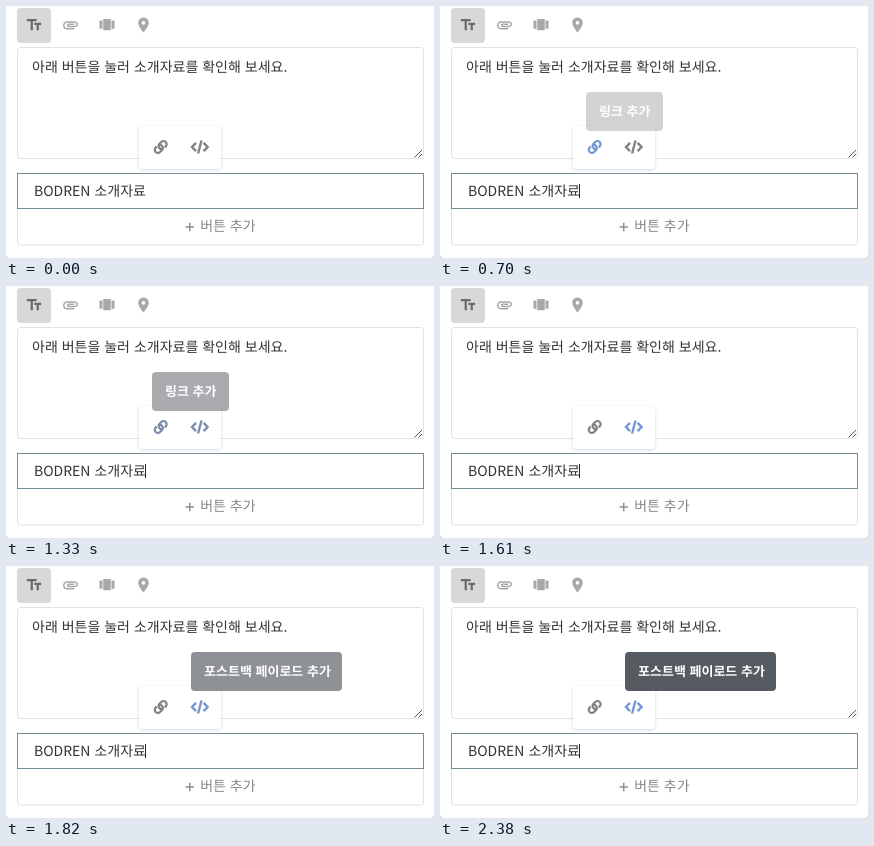
Recreate the animation shown at these times as an HTML page. Size 428 by 252 pixels, loop 2800 ms.

```html
<!DOCTYPE html>
<html lang="ko">
<head>
<meta charset="utf-8">
<style>
  html, body { margin: 0; width: 100%; height: 100%; overflow: hidden; background: #ccc; }
  svg { display: block; width: 428px; height: 252px; fill: none; }
  text {
    font: 14px "Noto Sans CJK KR", "Noto Sans CJK", sans-serif;
    fill: #333;
    text-rendering: geometricPrecision;
  }
  .icon { fill: #a8a8a8; }
  .box { fill: #fff; stroke: #e2e2e2; }
  .popup { fill: #fff; filter: drop-shadow(0 1.5px 1.5px rgba(40, 50, 80, .2)); }
  .tip rect { fill: #565a61; }
  .tip text { font-size: 13px; font-weight: 700; fill: #fff; }
</style>
</head>
<body>
<svg viewBox="0 0 428 252">
  <rect y="-9" width="428" height="261" rx="4" fill="#fff"/>

  <!-- tabs -->
  <rect x="11" y="2" width="34" height="35" rx="4" fill="#d8d8d8"/>
  <g class="icon">
    <path style="fill:#6c6c6c" transform="translate(19 10) scale(.75)" d="M2.5 4v3h5v12h3V7h5V4h-13zm19 5h-9v3h3v7h3v-7h3V9z"/>
    <path transform="translate(55.5 10) scale(.75)" d="M2 12.5C2 9.46 4.46 7 7.5 7H18c2.21 0 4 1.79 4 4s-1.79 4-4 4H9.5C8.12 15 7 13.88 7 12.5S8.12 10 9.5 10H17v2H9.41c-.55 0-.55 1 0 1H18c1.1 0 2-.9 2-2s-.9-2-2-2H7.5C5.57 9 4 10.57 4 12.5S5.57 16 7.5 16H17v2H7.5C4.46 18 2 15.54 2 12.5z"/>
    <path transform="translate(92 10) scale(.75)" d="M7 19h10V4H7v15zm-5-2h4V6H2v11zM18 6v11h4V6h-4z"/>
    <path transform="translate(128.5 10) scale(.75)" d="M12 2C8.13 2 5 5.13 5 9c0 5.25 7 13 7 13s7-7.75 7-13c0-3.87-3.13-7-7-7zm0 9.5a2.5 2.5 0 0 1 0-5 2.5 2.5 0 0 1 0 5z"/>
  </g>

  <!-- message -->
  <rect class="box" x="11.5" y="41.5" width="406" height="111" rx="3"/>
  <text x="26" y="65.5">아래 버튼을 눌러 소개자료를 확인해 보세요.</text>
  <path d="M408.5 151.5l7.5-7.5M412.5 151.5l3.5-3.5" stroke="#555"/>

  <!-- buttons -->
  <path class="box" d="M11.5 203V236a3 3 0 0 0 3 3H414.5a3 3 0 0 0 3-3V203"/>
  <path d="M179.5 221h8.5M183.75 216.75v8.5" stroke="#8f8f8f" stroke-width="1.5"/>
  <text x="194.2" y="225" style="fill:#888">버튼 추가</text>
  <rect x="11.5" y="167.5" width="406" height="35" fill="#fff" stroke="#738d97"/>
  <text x="28" y="189.5">BODREN 소개자료</text>
  <path id="caret" d="M139.5 178v14" stroke="#222"/>

  <!-- popup -->
  <rect class="popup" x="133" y="120" width="82" height="43" rx="4"/>
  <g id="link" transform="translate(154.7 141) rotate(-45)" stroke-width="2.2">
    <path id="loop" d="M-2.6-3.1H-4a3.1 3.1 0 0 0 0 6.2H-1.4A3.1 3.1 0 0 0 .2-2.65"/>
    <use href="#loop" transform="rotate(180)"/>
  </g>
  <path id="code" d="M190 136.8l-4 4.2 4 4.2M195.5 134.5l-3.4 13M197.6 136.8l4 4.2-4 4.2" stroke-width="2.4"/>

  <!-- tooltips -->
  <g id="linkTip" class="tip">
    <rect x="146" y="86" width="77" height="39" rx="4"/>
    <text x="159" y="109.5">링크 추가</text>
  </g>
  <g id="codeTip" class="tip">
    <rect x="185" y="86" width="151" height="39" rx="4"/>
    <text x="198" y="109.5">포스트백 페이로드 추가</text>
  </g>
</svg>
<script>
const LOOP = 2800, STEP = 70;
const GREY = [130, 130, 130], BLUE = [116, 152, 212];
const $ = id => document.getElementById(id);

const ease = (t, from, to) => {
  const p = Math.min(1, Math.max(0, (t - from) / (to - from)));
  return p * p * (3 - 2 * p);
};
const tint = k => `rgb(${GREY.map((g, i) => Math.round(g + (BLUE[i] - g) * k))})`;

function draw(now) {
  const t = Math.floor(now % LOOP / STEP) * STEP;
  const leave = ease(t, 1260, 1400);
  $('link').style.stroke = tint(ease(t, 280, 420) - leave);
  $('code').style.stroke = tint(leave);
  $('linkTip').style.opacity = ease(t, 630, 840) - leave;
  $('codeTip').style.opacity = ease(t, 1710, 1890);
  const caretOn = (t >= 350 && t < 840) || (t >= 1330 && t < 1890) || t >= 2380;
  $('caret').style.opacity = caretOn ? 1 : 0;
}

const start = performance.now();
function tick() {
  draw(performance.now() - start);
  requestAnimationFrame(tick);
}
tick();
</script>
</body>
</html>
```
